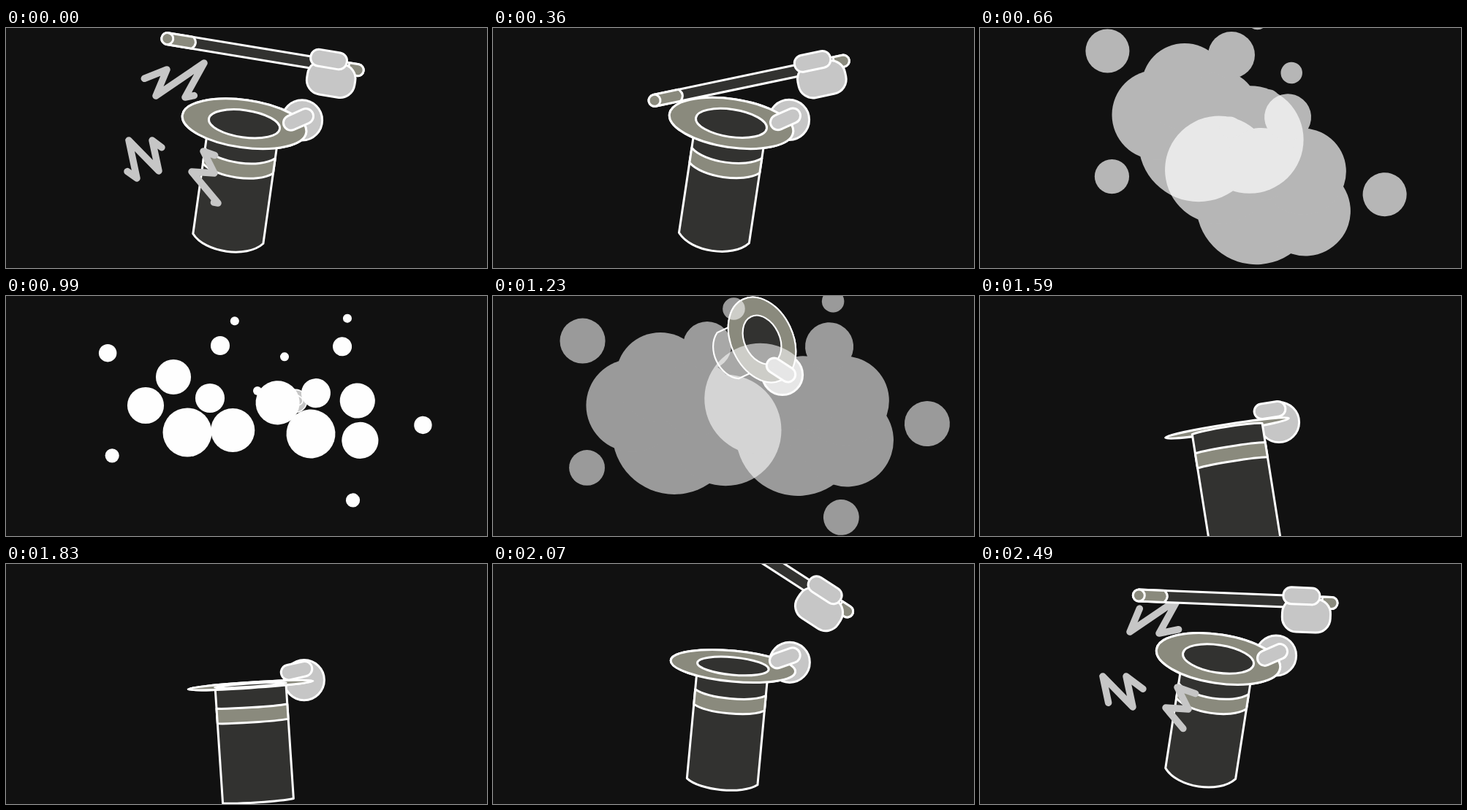
Animation, 658 px wide and 329 px high, one loop 2520 ms. Source, as an HTML page:

```html
<!DOCTYPE html>
<html lang="en">
<head>
<meta charset="utf-8">
<title>Magic hat</title>
<style>
  html, body { margin: 0; width: 100%; height: 100%; overflow: hidden; background: #111; }
  svg { display: block; width: 100%; height: 100%; }
  .ink { stroke: #fff; stroke-width: 3; stroke-linejoin: round; }
  .dark { fill: #323230; }
  .olive { fill: #8a8a7d; }
  .glove { fill: #c6c6c6; }
  .bolt { fill: none; stroke: #c6c6c6; stroke-width: 9.5; stroke-linecap: round; stroke-linejoin: round; }
  .smoke { fill: #fefefe; }
</style>
</head>
<body>
<svg viewBox="0 0 658 329">
  <rect width="658" height="329" fill="#111"/>
  <g id="act">
    <circle id="palm" class="ink glove" r="27.6"/>
    <g id="hat">
      <ellipse id="brimBack" class="ink olive" rx="85.5"/>
      <path id="crown" class="ink dark"/>
      <path id="band" class="ink olive"/>
      <g id="top">
        <ellipse id="brim" class="ink olive" rx="85.5"/>
        <ellipse id="hole" class="ink dark" rx="49"/>
      </g>
    </g>
    <rect id="thumb" class="ink glove" x="-21.5" y="-10.3" width="43" height="20.6" rx="10.3"/>
  </g>
  <g id="bolts"></g>
  <g id="wand">
    <rect class="ink dark" x="-241" y="-8" width="280" height="16" rx="8"/>
    <path class="ink olive" d="M-233 -8H-198Q-190 0 -198 8H-233Z"/>
    <circle class="ink olive" cx="-233" r="8"/>
    <path class="ink olive" d="M18 -8H31A8 8 0 0 1 31 8H18Z"/>
    <rect class="ink glove" x="-36" y="-4.5" width="66" height="46" rx="20"/>
    <rect class="ink glove" x="-35.5" y="-19.5" width="50" height="23" rx="11"/>
  </g>
  <g id="puffs"></g>
</svg>
<script>
const LOOP = 2520, NS = 'http://www.w3.org/2000/svg';
// Times of the reveal, of the first tap and of the tap that makes the hat vanish
const POP = 914, TAP = 2385, VANISH = 2890;

const $ = id => document.getElementById(id);
const set = (el, attrs) => { for (const k in attrs) el.setAttribute(k, attrs[k]); return el; };
const add = (parent, tag, attrs = {}) => set(parent.appendChild(document.createElementNS(NS, tag)), attrs);
const show = (el, on) => set(el, { display: on ? 'inline' : 'none' });
const place = (el, x, y, angle, s) =>
  set(el, { transform: `translate(${x} ${y}) rotate(${angle}) scale(${s})` });

const span = (t, a, b) => Math.max(0, Math.min(1, (t - a) / (b - a)));
const smooth = (t, a, b) => { const u = span(t, a, b); return u * u * (3 - 2 * u); };
const easeOut = (u, n) => 1 - (1 - u) ** n;

const bolts = [
  'M296 85L245 95L271 48L205 93L220 57L140 89',
  'M240 184L200 154L209 196L168 154L179 206L129 170',
  'M310 183L270 169L285 199L254 197L290 240L250 234'
].map(d => add($('bolts'), 'path', { class: 'bolt', d, pathLength: 1 }));

// x, y, radius, sideways drift; sparks fly out diagonally
const core = [
  [0, 0, 83.5], [57, -3, 75, 13], [-57, -37, 62.5], [-19, -76, 60],
  [31, -47, 50], [45, -119, 32.5], [96, -57, 15]
];
const sparks = [[-98, -98, 30.5], [54, -142, 15], [-92, 21, 24]];
const cloud = [
  ...core.map(([x, y, r, vx = 0]) => ({ x, y, r, vx, vy: 0 })),
  ...sparks.map(([x, y, r]) => ({ x, y, r, vx: 27 * Math.sign(x), vy: 27 * Math.sign(y) }))
];

function puff(start, x, y, turn = '') {
  const g = add($('puffs'), 'g', { class: 'smoke', transform: `translate(${x} ${y}) ${turn}` });
  return { start, g, dots: cloud.map(() => add(g, 'circle')) };
}
const flip = 'rotate(40.5) scale(-1 1)';
const puffs = [
  puff(POP, 248, 187), puff(POP, 417, 189, flip),
  puff(VANISH, 299, 156), puff(VANISH, 378, 242, flip)
];

function drawHat(t) {
  const rise = smooth(t, POP, 1230), fall = smooth(t, 1230, 1590);
  const settle = smooth(t, 1590, 2260), open = smooth(t, 1590, 2360);
  const dip = Math.sin(Math.PI * span(t, 2490, VANISH));
  const gone = smooth(t, VANISH, VANISH + 100);

  const ry = 59 - 64 * fall + 38.4 * open - 3.4 * dip;
  const size = easeOut(span(t, POP, 1590), 2) * (1 - gone);
  const grip = easeOut(span(t, POP, 1230), 3) * (1 - gone);
  show($('act'), size > .005);
  place($('hat'),
    373 - 5 * rise - 30 * fall - 12 * settle,
    150 - 90 * rise + 121 * fall - 51 * settle + 5.6 * dip,
    110 - 45 * rise - 74 * fall + 17.8 * settle - 3.4 * dip, size);
  drawShape(ry, 72 + 87 * fall);

  const px = 396 + 13 * fall - 4 * settle, py = 150 - 42 * rise + 65 * fall - 47.5 * settle + 4 * dip;
  place($('palm'), px, py, 0, grip);
  place($('thumb'),
    px - (2 + 10.5 * fall - 7.5 * settle) * grip,
    py - (6.5 + 10 * fall - 15.5 * open) * grip,
    33 - 42 * fall - 15 * open, grip);
}

// ry is the tilt of the brim: negative when seen from below
function drawShape(ry, len) {
  const above = Math.max(0, ry), w = 48.5;
  const sag = Math.sign(ry) * Math.min(24, Math.abs(ry) * .54);
  const arc = (y, dir, bow) => {
    const c = y + bow * 4 / 3;
    return `C${-dir * w * .6} ${c} ${dir * w * .6} ${c} ${dir * w} ${y}`;
  };
  const strip = (a, b, bowA, bowB) => `M${-w} ${a}${arc(a, 1, bowA)}V${b}${arc(b, -1, bowB)}Z`;
  const y = 27.5 + .42 * above, bow = sag * .72;
  set($('brimBack'), { ry: Math.abs(ry) });
  set($('brim'), { ry: above });
  set($('hole'), { ry: above * .57 });
  show($('top'), above);
  set($('crown'), { d: strip(1, len, above ? 0 : sag, sag) });
  set($('band'), { d: strip(y, y + 20.5, bow, bow) });
  show($('band'), len > 100);
}

function drawWand(t) {
  const away = 1 - smooth(t, 1790, 2250), far = away ** 3;
  const lift = Math.sin(Math.PI * (t - TAP) / (VANISH - TAP)) ** 2;
  const gone = smooth(t, VANISH, VANISH + 95);
  const kept = t < VANISH ? lift : 0;
  show($('wand'), t > 1790 && gone < 1);
  place($('wand'),
    449 + 3 * kept + 180 * far - 30 * gone,
    51.5 + 2 * kept - 130 * far + 36 * gone,
    -12 + 38.6 * kept + 35 * away, 1 - gone);
}

function drawBolts(t) {
  const head = easeOut(span(t, TAP - 4, TAP + 233), 2);
  const tail = span(t, TAP - 11, TAP + 399) ** 2;
  for (const el of bolts) {
    show(el, head > tail);
    set(el, { 'stroke-dasharray': `${Math.max(0, head - tail)} 3`, 'stroke-dashoffset': -tail });
  }
}

function drawPuff({ start, g, dots }, t) {
  const age = t - start, p = 1.14 * easeOut(span(age, 0, 740), 4);
  const alpha = 1 - span(age, 225, 441);
  show(g, age > 0 && alpha > 0);
  set(g, { opacity: alpha });
  cloud.forEach(({ x, y, r, vx, vy }, i) =>
    set(dots[i], { cx: x + vx * p, cy: y + vy * p, r: r * p }));
}

function draw(now) {
  let t = now % LOOP;
  if (t < 880) t += LOOP; // one trick runs across the loop point
  drawHat(t);
  drawBolts(t);
  drawWand(t);
  puffs.forEach(p => drawPuff(p, t));
}

let origin;
function tick(now) {
  origin ??= now;
  draw(now - origin);
  requestAnimationFrame(tick);
}
draw(0);
requestAnimationFrame(tick);
</script>
</body>
</html>
```
